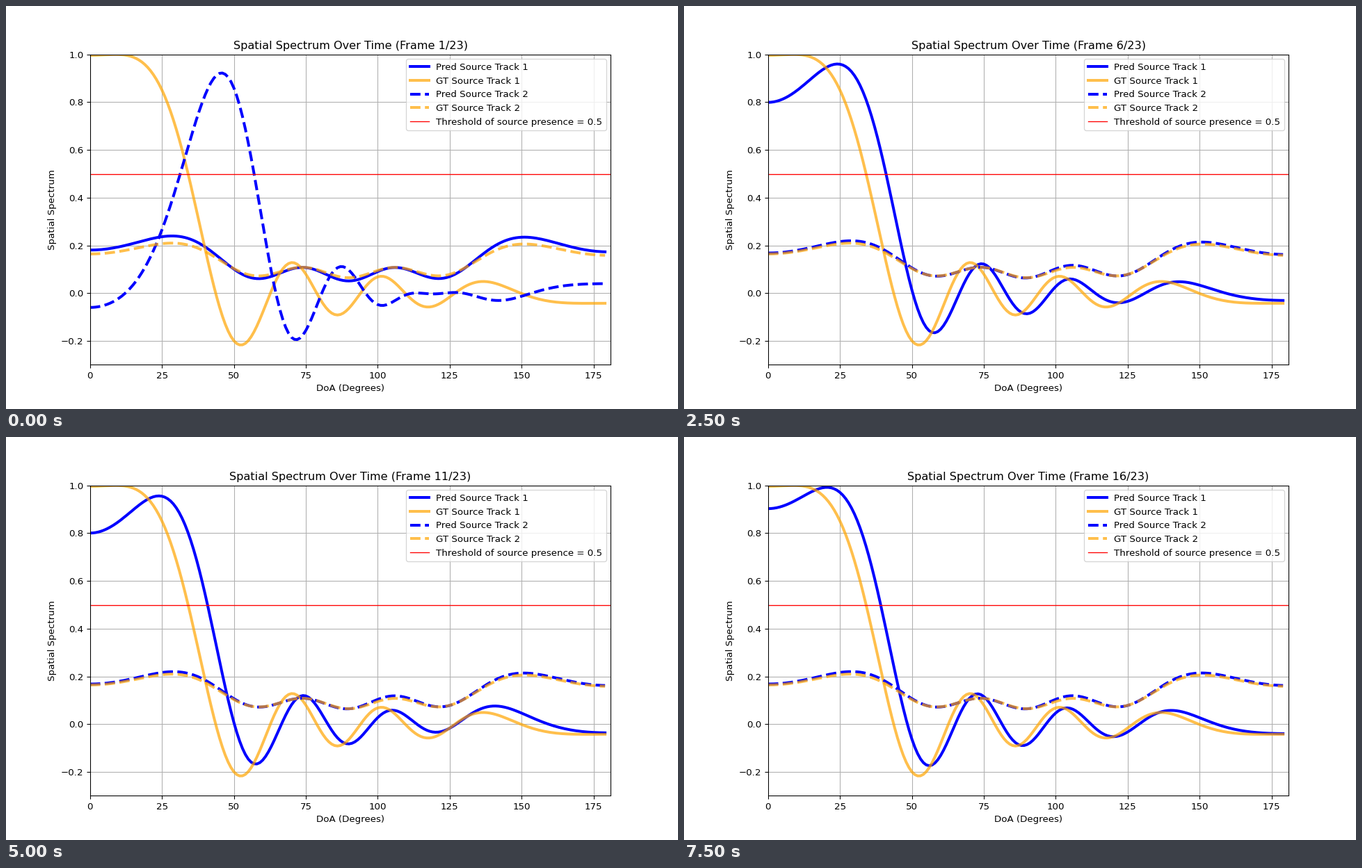
These frames come from a looping animation (966 by 580 pixels, 8000 ms). A matplotlib script:

```python
import numpy as np
import matplotlib.pyplot as plt
from matplotlib.animation import FuncAnimation

DPI = 96
FRAMES, TOTAL, STEP_MS = 16, 23, 500
K = 11.88               # array bandwidth in cos(angle)
DIP_OFFSET = 4.493 / K  # distance from a sinc peak to its first dip
DIP_LEVEL = 0.217
SETTLE = 3.3            # steps until the estimate calms down

# Main lobe over time: step, angle, height, filling of the first dip.
LOBE = np.array([
    (0, 46.0, 0.930, 0.000),
    (1, 25.5, 0.945, 0.040),
    (3, 25.5, 0.945, 0.040),
    (6, 23.5, 0.964, 0.046),
    (8, 22.7, 0.936, 0.065),
    (10, 24.0, 0.956, 0.040),
    (12, 21.5, 0.952, 0.060),
    (15, 20.5, 0.992, 0.043),
]).T


def cosd(deg):
    return np.cos(np.radians(deg))


theta = np.arange(180)
u = cosd(theta)


def beam(center):
    return np.sinc(K * (u - center) / np.pi)


gt_source = beam(cosd(9))
gt_empty = np.mean([beam(c) for c in u], axis=0)


def source_curve(i):
    """Steered beam with weakened side lobes and a partly filled dip."""
    angle, height, fill = (np.interp(i, LOBE[0], row) for row in LOBE[1:])
    center = cosd(angle)
    unrest = np.exp(-i / SETTLE)
    side_fade = 1 - unrest * np.exp(-((u + 0.5) / 0.28) ** 2)
    rear_lift = 0.04 * np.exp(-((i - 10.5) / 4) ** 2)
    return ((height + DIP_LEVEL * fill) * beam(center) * side_fade
            + fill * beam(center - DIP_OFFSET)
            + rear_lift * beam(-0.68)
            + 0.06 * unrest ** 2 * beam(1))


def empty_curve(i):
    """Diffuse level: high contrast at first, later three faint lifts."""
    unrest = np.exp(-i / SETTLE)
    lift = 0.011 * beam(0.8) + 0.011 * beam(-0.27) + 0.008 * beam(-0.8)
    return (gt_empty + 0.3 * unrest ** 2 * (gt_empty - 0.11)
            + (1 - unrest) * lift)


plt.rcParams["font.size"] = 10.06
fig, ax = plt.subplots(figsize=(966 / DPI, 580 / DPI), dpi=DPI)
fig.subplots_adjust(bottom=0.1097, top=0.8797)
pred = dict(color="blue", lw=3)
truth = dict(color="orange", lw=3, alpha=0.7)

pred1, = ax.plot(theta, gt_source, label="Pred Source Track 1", **pred)
ax.plot(theta, gt_source, label="GT Source Track 1", **truth)
pred2, = ax.plot(theta, gt_empty, "--", label="Pred Source Track 2", **pred)
ax.plot(theta, gt_empty, "--", label="GT Source Track 2", **truth)
ax.axhline(0.5, color="red", lw=1, label="Threshold of source presence = 0.5")

ax.set(xlim=(0, 181), ylim=(-0.3, 1.0),
       xlabel="DoA (Degrees)", ylabel="Spatial Spectrum")
title = ax.set_title("")
ax.grid(True)
ax.legend(loc="upper right")


def update(i):
    # The two tracks start out swapped.
    loud, quiet = (pred2, pred1) if i == 0 else (pred1, pred2)
    loud.set_ydata(source_curve(i))
    quiet.set_ydata(empty_curve(i))
    title.set_text(f"Spatial Spectrum Over Time (Frame {i + 1}/{TOTAL})")
    return pred1, pred2, title


anim = FuncAnimation(fig, update, frames=FRAMES, interval=STEP_MS,
                     repeat=True, repeat_delay=0, blit=False)
plt.show()
```
